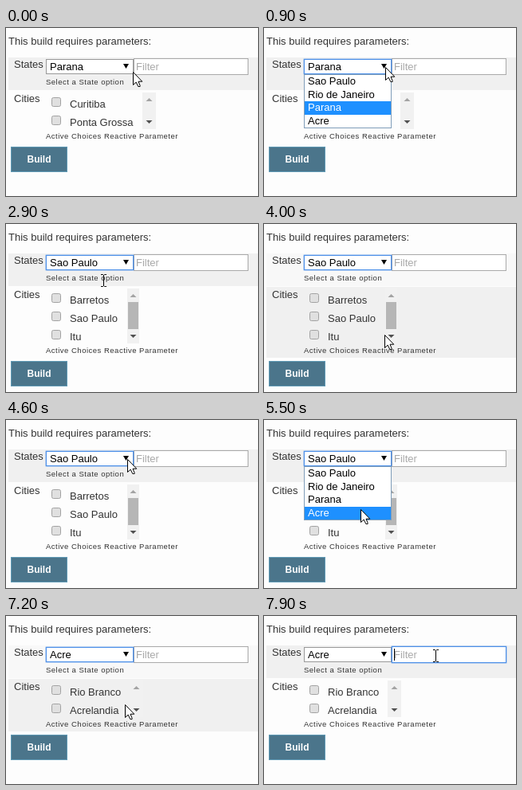
These frames come from a looping animation (316 by 211 pixels, 8 s). An HTML page:

```html
<!DOCTYPE html>
<html lang="en">
<head>
<meta charset="utf-8">
<title>Build parameters</title>
<style>
  html, body { margin: 0; width: 100%; height: 100%; overflow: hidden; background: #fdfdfd; }
  svg { display: block; width: 100vw; height: 100vh; }
  text { font: 13px "Liberation Sans", Arial, sans-serif; fill: #333; }
  .field { fill: #000; }
  .hint { fill: #a9a9a9; }
  .picked { fill: #fff; }
  .note { font-size: 9.5px; letter-spacing: .5px; }
  .button { font-size: 12px; font-weight: bold; fill: #fff; text-anchor: middle; }
</style>
</head>
<body>
<svg id="stage" viewBox="0 0 316 211"></svg>
<script>
const LOOP = 8000, STEP = 100;
const STATES = ['Sao Paulo', 'Rio de Janeiro', 'Parana', 'Acre'];
const CITIES = {
  'Sao Paulo': { names: ['Barretos', 'Sao Paulo', 'Itu'], barX: 152, barWidth: 15, scrolls: true },
  'Parana': { names: ['Curitiba', 'Ponta Grossa'], barX: 171, barWidth: 17 },
  'Acre': { names: ['Rio Branco', 'Acrelandia'], barX: 155, barWidth: 17 }
};

// Pointer path: [step, x, y]
const PATH = [
  [0, 159, 55], [3, 150, 49], [4, 150, 49], [6, 152, 49], [12, 152, 49],
  [13, 142, 59], [14, 129, 64], [28, 129, 64], [29, 122, 71],
  [37, 146, 144], [38, 144, 144], [39, 144, 144], [40, 151, 139],
  [46, 152, 49], [52, 152, 49], [55, 121, 112], [56, 119, 122], [59, 119, 122],
  [62, 144, 115], [71, 144, 115], [72, 149, 111], [78, 215, 50], [80, 215, 50]
];

function pointerAt(step) {
  const next = PATH.findIndex(point => point[0] > step);
  const [s0, x0, y0] = PATH[next - 1], [s1, x1, y1] = PATH[next];
  const k = (step - s0) / (s1 - s0);
  return [Math.round(x0 + (x1 - x0) * k), Math.round(y0 + (y1 - y0) * k)];
}

const rect = (x, y, w, h, fill, extra = '') =>
  `<rect x="${x}" y="${y}" width="${w}" height="${h}" fill="${fill}" ${extra}/>`;
const frame = (x, y, w, h, stroke, fill = '#fff', extra = '') =>
  rect(x + .5, y + .5, w - 1, h - 1, fill, `stroke="${stroke}" ${extra}`);
const text = (x, y, content, style = '') =>
  `<text x="${x}" y="${y}" class="${style}">${content}</text>`;
const triangle = (x, y, dy, fill, half = 4) =>
  `<path d="M${x - half} ${y}h${2 * half}l${-half} ${dy}z" fill="${fill}"/>`;
const focusRing = (x, y, w, h) =>
  frame(x, y, w, h, '#4d90e8', 'none')
  + frame(x - 1, y - 1, w + 2, h + 2, '#4d90e8', 'none', 'rx="1" stroke-opacity=".35"');

function stateRow(selected, selectFocused, filterFocused) {
  return text(10, 50, 'States')
    + frame(50, 39, 110, 19, '#999') + text(55, 53, selected, 'field')
    + triangle(150.5, 45, 6, '#000', 3.5)
    + frame(160, 38, 144, 21, '#aaa') + text(163, 53, 'Filter', 'hint')
    + (selectFocused ? focusRing(50, 39, 110, 19) : '')
    + (filterFocused ? focusRing(160, 38, 144, 21) + rect(163, 41, 1, 15, '#000') : '')
    + text(50, 71, 'Select a State option', 'note');
}

function cityRow({ names, barX, barWidth, scrolls }) {
  const height = names.length * 23, mid = barX + barWidth / 2;
  return text(10, 93, 'Cities')
    + names.map((name, i) => frame(57, 87 + 23 * i, 12, 12, '#a2a2a2', '#e0e0e0', 'rx="2"')
      + text(80, 100 + 23 * i, name)).join('')
    + rect(barX, 81, barWidth, height, '#f1f1f1')
    + (scrolls ? rect(barX + 1, 98, barWidth - 2, 34, '#b6b6b6') : '')
    + triangle(mid, 92, -4, '#a3a3a3')
    + triangle(mid, 70 + height, 4, '#505050')
    + text(50, 93 + height, 'Active Choices Reactive Parameter', 'note');
}

function dropdown(picked) {
  const rowTop = i => Math.round(59 + 16.5 * i);
  return frame(50, 58, 110, 68, '#7f9db9')
    + STATES.map((name, i) => {
      const y = rowTop(i), isPicked = i === picked;
      return (isPicked ? rect(51, y, 108, rowTop(i + 1) - y, '#1e90ff') : '')
        + text(55, y + 12, name, isPicked ? 'picked' : 'field');
    }).join('');
}

const arrow = (x, y) =>
  `<path transform="translate(${x + .5} ${y + .5})" d="M0 0V16L3.7 12.6L6.3 18H8.6V16.8L6.5 11.7H11.3Z" fill="#fff" stroke="#000" stroke-linejoin="round"/>`;
const beam = (x, y) =>
  `<path transform="translate(${x + .5} ${y})" d="M-3.5 -7.5H-1L0 -6.5L1 -7.5H3.5M0 -7V7M-3.5 7.5H-1L0 6.5L1 7.5H3.5" fill="none" stroke="#000"/>`;

function render(step) {
  const [x, y] = pointerAt(step);
  const open = (step >= 9 && step < 20) || (step >= 49 && step < 59);
  const selected = step < 20 ? 'Parana' : step < 59 ? 'Sao Paulo' : 'Acre';
  const filterFocused = step >= 79;
  const cities = CITIES[selected];
  const bottom = 99 + cities.names.length * 23;
  const overStates = open || y < 79;
  const overNote = x >= 50 && x <= 147 && y >= 62 && y <= 73;
  const overFilter = x > 161 && y >= 38 && y < 59;
  const picked = y < 59 ? STATES.indexOf(selected) : Math.floor((y - 59) / 16.5);

  return rect(0, 0, 316, 211, '#fdfdfd')
    + rect(3, 37, 313, 41, overStates ? '#f0f0f0' : '#f8f8f8')
    + (overStates ? '' : rect(3, 79, 313, bottom - 79, '#f0f0f0'))
    + text(3, 21, 'This build requires parameters:')
    + stateRow(selected, step >= 9 && !filterFocused, filterFocused)
    + cityRow(cities)
    + frame(6, bottom + 4, 71, 32, '#5f9ab5', '#4b758b')
    + text(41.5, bottom + 24, 'Build', 'button')
    + (open ? dropdown(picked) : '')
    + (!open && (overNote || overFilter) ? beam(x, y) : arrow(x, y));
}

const stage = document.getElementById('stage');
const start = performance.now();
let shown = -1;
function tick() {
  const step = Math.floor(((performance.now() - start) % LOOP) / STEP);
  if (step !== shown) stage.innerHTML = render(shown = step);
  requestAnimationFrame(tick);
}
tick();
</script>
</body>
</html>
```
